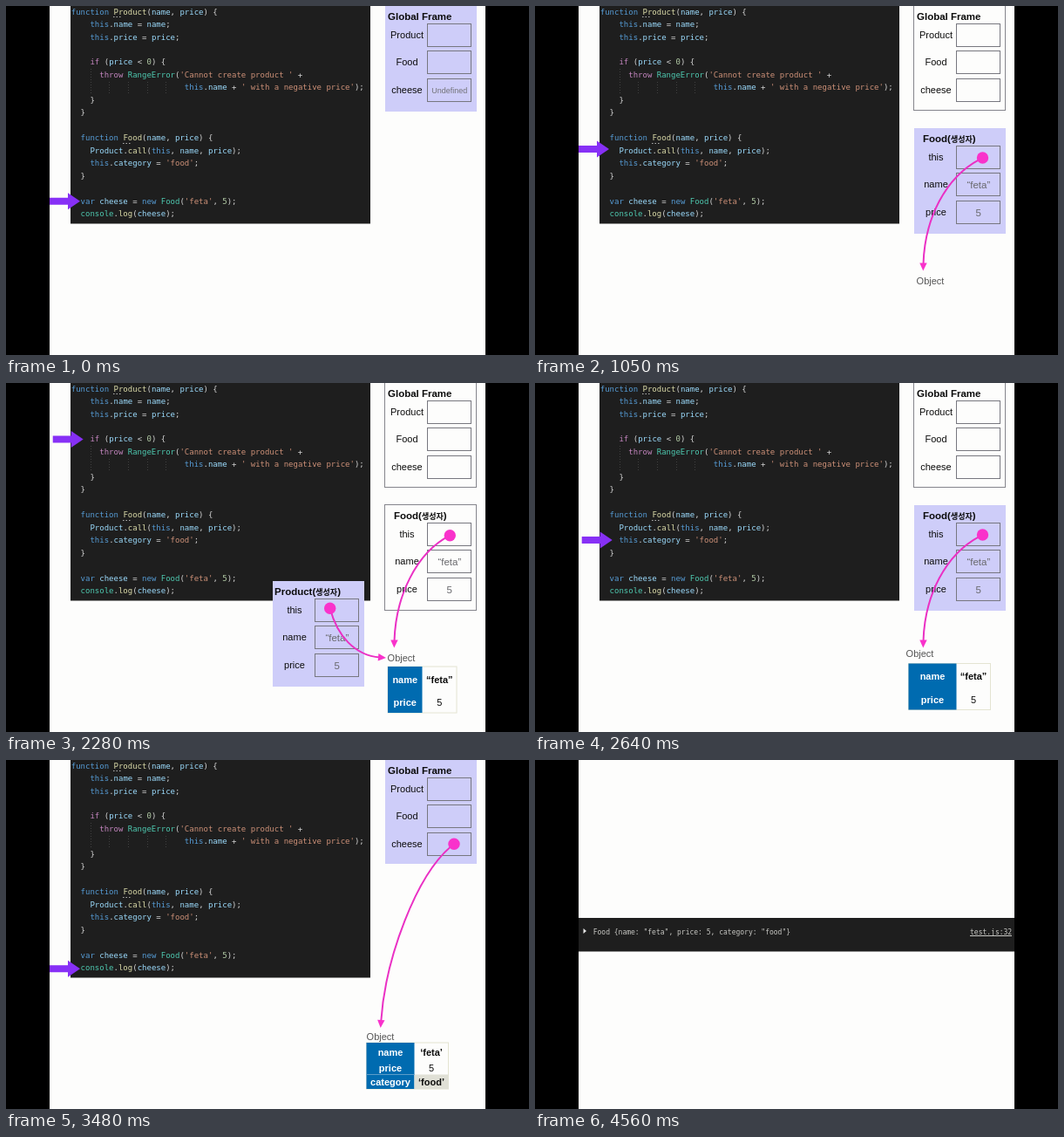
An HTML page that plays this animation: 600x400 px, repeating every 4.62 s.

```html
<!DOCTYPE html>
<html lang="en">
<head>
<meta charset="utf-8">
<title>Constructor call, step by step</title>
<style>
  html, body { margin: 0; width: 100%; height: 100%; overflow: hidden; background: #000; }
  svg { display: block; width: 600px; height: 400px; }
  text { font: 11px "Liberation Sans", Arial, sans-serif; fill: #0c0c0c; white-space: pre; }
  .mid { text-anchor: middle; }
  .bold { font-weight: bold; }
  .title { font-size: 11.5px; font-weight: bold; }
  .ko { font: bold 9px "Noto Sans CJK KR", "Noto Sans CJK", sans-serif; }
  .val { font-size: 11.5px; fill: #68686c; }
  .small { font-size: 9px; fill: #737378; }
  .ret { font-size: 10px; font-weight: bold; fill: #a8301e; }
  .obj { fill: #555; }
  .key { font-weight: bold; fill: #fff; }
  .code text { font: 9px "DejaVu Sans Mono", monospace; fill: #d4d4d4; }
  .code .k { fill: #569cd6; }
  .code .v { fill: #9cdcfe; }
  .code .c { fill: #c586c0; }
  .code .g { fill: #4ec9b0; }
  .code .f { fill: #dcdcaa; }
  .code .s { fill: #ce9178; }
  .code .n { fill: #b5cea8; }
  .log text { font: 8px "DejaVu Sans Mono", monospace; fill: #c8c8c4; }
  .cell { fill: none; stroke: #77777f; }
  .wire { fill: none; stroke: #ea30c4; stroke-width: 2; }
  .pink { fill: #f932cb; }
</style>
</head>
<body>
<svg id="stage" viewBox="0 0 600 400"></svg>
<script>
const LOOP = 4620;
const STEP = 4020 / 7;
const INK = '#1e1e1e', LILAC = '#cecdf9', BLUE = '#006bb0', PAPER = '#fdfdfc';
const RULE = '#e4e4d2';

const rect = (x, y, w, h, attrs) =>
  `<rect x="${x}" y="${y}" width="${w}" height="${h}" ${attrs}/>`;
const text = (x, y, str, cls = '') => `<text x="${x}" y="${y}" class="${cls}">${str}</text>`;
const line = (d, color) => `<path d="${d}" fill="none" stroke="${color}"/>`;

// [row, column, markup]; {k:word} colours a word
const CODE = [
  [0, -2, '{k:function} {f:Product}({v:name}, {v:price}) {'],
  [1, 2, '{k:this}.{v:name} = {v:name};'],
  [2, 2, '{k:this}.{v:price} = {v:price};'],
  [4, 2, '{c:if} ({v:price} &lt; {n:0}) {'],
  [5, 4, "{c:throw} {g:RangeError}({s:'Cannot create product '} +"],
  [6, 22, "{k:this}.{v:name} + {s:' with a negative price'});"],
  [7, 2, '}'],
  [8, 0, '}'],
  [10, 0, '{k:function} {f:Food}({v:name}, {v:price}) {'],
  [11, 2, '{v:Product}.{f:call}({k:this}, {v:name}, {v:price});'],
  [12, 2, "{k:this}.{v:category} = {s:'food'};"],
  [13, 0, '}'],
  [15, 0, "{k:var} {v:cheese} = {k:new} {g:Food}({s:'feta'}, {n:5});"],
  [16, 0, '{g:console}.{f:log}({v:cheese});']
];

function codePanel() {
  const lines = CODE.map(([row, col, src]) => {
    const spans = src.replace(/\{(\w):([^}]*)\}/g, '<tspan class="$1">$2</tspan>');
    return text(85.6 + col * 5.42, 9.6 + row * 14.47, spans);
  });
  const guides = 'M97.5 72V101M118.5 87V101M140.5 87V101M162.5 87V101M183.5 87V101';
  const hints = 'M123 12.5H132M134 157.5H143';
  return '<g class="code">' + rect(74, 0, 344, 249.5, `fill="${INK}"`) +
    `<path d="${guides}" stroke="#404040" stroke-dasharray="1 2"/>` +
    `<path d="${hints}" stroke="#b0b0b0" stroke-dasharray="1.5 2"/>` +
    lines.join('') + '</g>';
}

function frame(x, y, { title, dx, labels, values = [], lit, h = 121, ret }) {
  let out = lit
    ? rect(x, y, 105, h, `fill="${LILAC}"`)
    : rect(x - 0.5, y - 0.5, 105, h, `fill="${PAPER}" stroke="#85858c"`);
  out += text(x + dx, y + 16.2, title, 'title');
  labels.forEach((label, i) => {
    const top = y + Math.round(i * 31.4);
    out += rect(x + 48.5, top + 20.5, 50, 26, 'class="cell"');
    out += text(x + 25, top + 37.3, label, 'mid');
    if (values[i]) out += text(x + 73.8, top + 37.8, values[i], 'mid val');
  });
  if (ret) {
    out += rect(x + 48.5, y + 114.5, 50, 26, 'class="cell"') +
      text(x + 25, y + 125, 'Retrurn', 'mid ret') + text(x + 25, y + 138, 'Value', 'mid ret');
  }
  return out;
}

const built = name => `${name}(<tspan class="ko">생성자</tspan>)`;
const ARGS = { labels: ['this', 'name', 'price'], values: ['', '“feta”', '5'] };
const globalFrame = (lit, h = 120) =>
  frame(435, 0, { title: 'Global Frame', dx: 3, labels: ['Product', 'Food', 'cheese'], lit, h });
const foodFrame = (lit, ret) =>
  frame(435, 140, { ...ARGS, title: built('Food'), dx: 10, lit, ret, h: ret ? 146 : 121 });
const productFrame = () =>
  frame(306, 227, { ...ARGS, title: built('Product'), dx: 2, lit: true });

function pointer(x, y) {
  return `<path transform="translate(${x} ${y})" fill="#8730f6"
    d="M0 -4H21V-9.5L35 0L21 9.5V4H0Z"/>`;
}

// Curve from a dot to an arrowhead pointing at (tx, ty)
function wire(x, y, curve, tx, ty, angle) {
  return `<path class="wire" d="M${x} ${y}C${curve}"/>` +
    `<circle class="pink" cx="${x}" cy="${y}" r="6.7"/>` +
    `<path class="pink" d="M0 0L-9 -4.2V4.2Z" transform="translate(${tx} ${ty}) rotate(${angle})"/>`;
}
const foodWire = (x, y) => wire(x, y, '470 195 447 245 445.5 296', 445.3, 303.5, 91);
const productWire = (x, y) => wire(x, y, '380 290 400 312 429 314.5', 436, 315, 5);

const objectLabel = (x, y) => text(x, y + 4, 'Object', 'mid obj');

function table(x, y, w, split, rows) {
  const bottom = rows[rows.length - 1].end;
  let out = rect(x, y, w, bottom, `fill="${PAPER}" stroke="${RULE}"`) +
    rect(x, y, split, bottom, `fill="${BLUE}"`);
  let top = 0;
  rows.forEach(({ key, val, end, at, shade, plain }) => {
    if (shade) {
      out += rect(x + split, y + top, w - split, end - top, 'fill="#e0e0d6"') +
        line(`M${x} ${y + top}h${split}`, '#5b9cc8');
    }
    out += text(x + split / 2, y + at, key, 'mid key') +
      text(x + (w + split) / 2, y + at, val, plain ? 'mid' : 'mid bold');
    top = end;
  });
  return out;
}
const pair = (x, y, w, split) => table(x, y, w, split, [
  { key: 'name', val: '“feta”', end: 27, at: 18.6 },
  { key: 'price', val: '5', end: 53, at: 45, plain: true }
]);
const triple = (x, y) => table(x, y, 94, 55, [
  { key: 'name', val: '‘feta’', end: 21.5, at: 14.6 },
  { key: 'price', val: '5', end: 36.5, at: 33, plain: true },
  { key: 'category', val: '‘food’', end: 53, at: 49.4, shade: true }
]);

const consoleView = '<g class="log">' + rect(50, 181, 500, 38.5, `fill="${INK}"`) +
  '<path d="M55.5 193L59 196L55.5 199Z" fill="#e4e4e4"/>' +
  text(66.7, 200, 'Food {name: "feta", price: 5, category: "food"}') +
  text(499, 200, 'test.js:32') + line('M499 201.5H547', '#c8c8c4') + '</g>';

const code = codePanel();
const slides = [
  code + globalFrame(true, 121) + text(508.8, 100.3, 'Undefined', 'mid small') + pointer(50, 223.7),
  code + globalFrame() + foodFrame(true) + foodWire(513.5, 174) +
    objectLabel(453.5, 314.5) + pointer(50, 164),
  code + globalFrame() + foodFrame() + productFrame() + foodWire(509.3, 178) +
    productWire(372.5, 261.3) + objectLabel(453.5, 314.5) + pointer(53.7, 21.5),
  code + globalFrame() + foodFrame() + productFrame() + foodWire(509.3, 174.7) +
    productWire(371.7, 258.2) + objectLabel(453.5, 314.5) + pair(438, 325, 79, 39.5) +
    pointer(53.7, 64.5),
  code + globalFrame() + foodFrame(true) + foodWire(513.5, 174) +
    objectLabel(441.5, 310) + pair(428.5, 321.5, 94, 55) + pointer(53.7, 180),
  code + globalFrame() + foodFrame(true, true) + foodWire(513.5, 174.5) +
    wire(508.7, 264.7, '485 275 472 292 470 313', 469.5, 320.5, 94) +
    objectLabel(441.5, 310) + triple(428.5, 321.5) + pointer(50, 194.7),
  code + globalFrame(true, 119) + wire(514, 96.2, '470 130 435 230 430.3 299', 429.7, 307, 94) +
    objectLabel(429.5, 317) + triple(413.5, 324) + pointer(50, 239.3),
  consoleView
];

const stage = document.getElementById('stage');
stage.innerHTML = rect(0, 0, 600, 400, 'fill="#000"') + rect(50, 0, 500, 400, `fill="${PAPER}"`) +
  slides.map(body => `<g class="slide" visibility="hidden">${body}</g>`).join('');

const groups = stage.querySelectorAll('.slide');
const start = performance.now();
let shown = -1;

function draw() {
  const t = (performance.now() - start) % LOOP;
  const now = Math.min(slides.length - 1, Math.floor(t / STEP));
  if (now !== shown) {
    groups.forEach((g, i) => g.setAttribute('visibility', i === now ? 'visible' : 'hidden'));
    shown = now;
  }
  requestAnimationFrame(draw);
}
draw();
</script>
</body>
</html>
```
